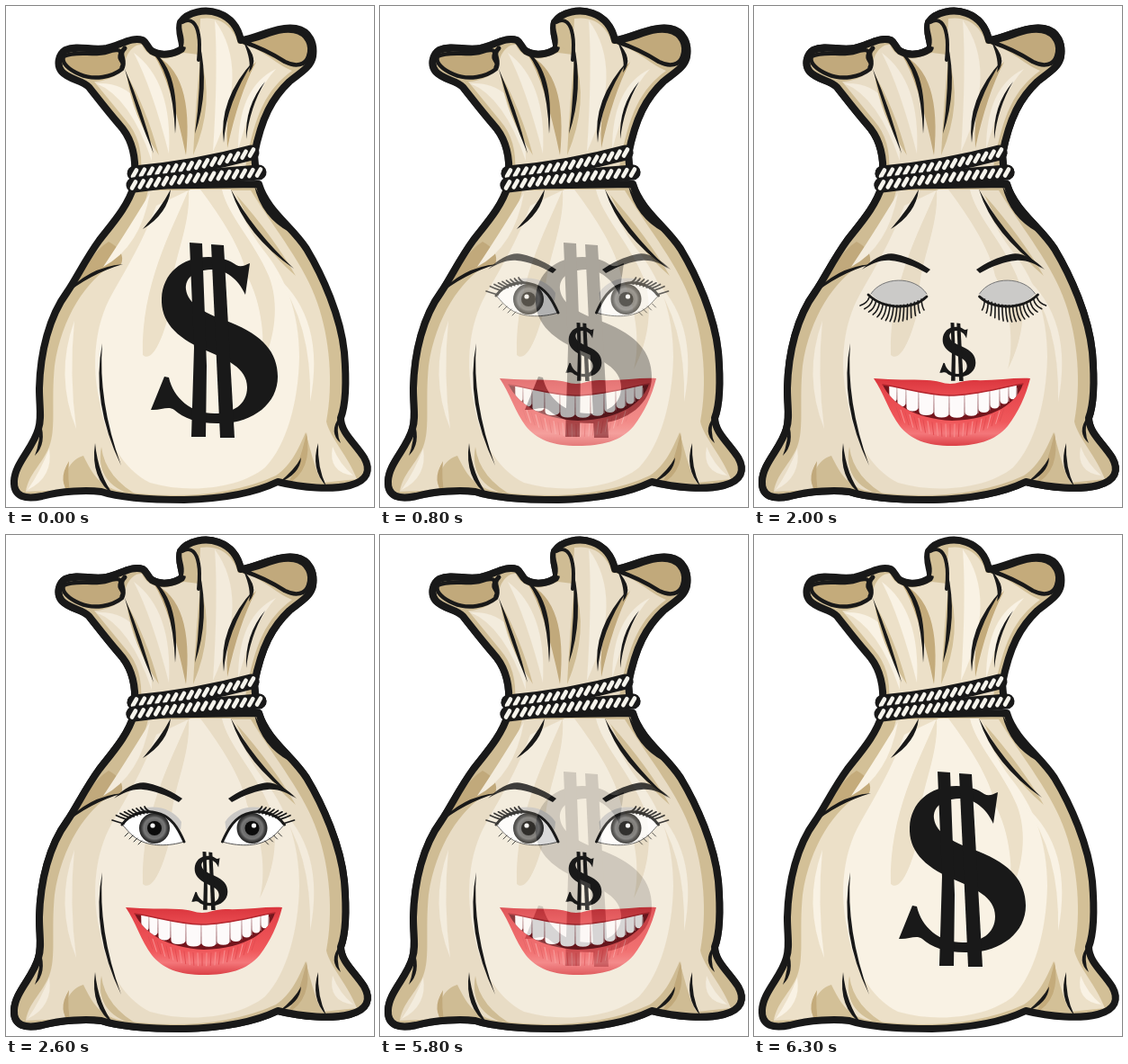
An HTML page with a canvas that plays this animation: 409 by 557 pixels, repeating every 6500 ms.

```html
<!DOCTYPE html>
<html lang="en">
<head>
<meta charset="utf-8">
<title>Money bag</title>
<style>
html, body { margin: 0; width: 100%; height: 100%; overflow: hidden; background: #fff; }
canvas { display: block; width: 100%; height: 100%; }
</style>
</head>
<body>
<canvas id="stage" width="409" height="557"></canvas>
<script>
const W = 409, H = 557, LOOP = 6500, INK = '#191919';
const stage = document.getElementById('stage').getContext('2d');
let g;

function layer(draw) {
  const c = document.createElement('canvas');
  c.width = W;
  c.height = H;
  g = c.getContext('2d');
  g.lineJoin = 'round';
  draw();
  return c;
}

function fill(d, color) {
  g.fillStyle = color;
  g.fill(new Path2D(d));
}

function line(d, width, color = INK, cap = 'round') {
  g.strokeStyle = color;
  g.lineWidth = width;
  g.lineCap = cap;
  g.stroke(new Path2D(d));
}

function inside(d, draw) {
  g.save();
  g.clip(new Path2D(d));
  draw();
  g.restore();
}

// Curved stroke that is pointed at both ends.
function blade(x0, y0, cx, cy, x1, y1, w, color = INK) {
  const len = Math.hypot(x1 - x0, y1 - y0);
  const nx = -(y1 - y0) / len * w, ny = (x1 - x0) / len * w;
  fill(`M${x0} ${y0}Q${cx + nx} ${cy + ny} ${x1} ${y1}Q${cx - nx} ${cy - ny} ${x0} ${y0}`, color);
}

function mirrored(axis, draw) {
  draw();
  g.save();
  g.translate(axis, 0);
  g.scale(-1, 1);
  draw();
  g.restore();
}

const BODY = 'M142 200C136 222 118 242 104 260C88 282 80 300 68 318C48 345 38 385 37 425C37 445 40 458 36 470C30 492 10 508 9 528C8 546 22 549 40 545C62 539 90 538 106 540C130 548 165 549 198 549C240 548 275 542 302 529C330 536 362 538 382 533C402 528 406 516 398 502C388 486 372 474 372 458C379 440 378 410 376 385C372 345 352 300 334 270C318 245 290 228 281 198Z';
const BODY_MID = 'M158 205C150 240 132 262 118 288C90 305 62 345 54 400C50 440 56 470 48 490C40 510 25 520 22 540L66 538C64 520 70 505 86 500C96 520 104 535 130 540C190 548 250 545 300 522C318 510 326 490 333 474C340 500 345 520 352 530L390 526C380 500 360 480 356 462C364 420 360 370 346 330C333 290 300 250 272 205Z';
const BODY_LIGHT = 'M167 222C152 262 135 290 118 320C98 355 95 400 104 440C110 480 130 515 160 530C205 543 260 536 288 513C312 488 325 440 326 390C326 340 310 300 285 270C270 250 258 225 250 204L205 204Z';
const NECK = 'M143 190C145 162 138 145 126 132C112 116 100 100 92 90C84 82 70 82 62 73C56 66 58 54 66 49C80 43 95 50 112 47C128 43 140 34 152 38C157 41 157 46 162 50C172 56 186 54 195 48C199 43 190 30 194 18C202 6 222 3 236 8C250 13 258 24 261 38C280 36 300 22 322 25C338 28 343 42 341 56C339 68 326 75 315 84C296 102 284 124 276 165L278 188Z';
const NECK_MID = 'M150 186C152 160 146 142 134 128L98 84C112 84 128 76 132 66C132 56 140 42 151 43C154 52 166 60 180 58L198 52L214 54L216 14C240 10 254 26 258 42C282 44 298 64 318 72C290 92 276 120 266 180Z';
const LEFT_LIP = 'M64 56C78 49 98 56 113 51C122 48 129 48 127 54C124 61 134 62 129 70C118 79 98 83 82 76C70 71 61 63 64 56Z';
const RIGHT_LIP = 'M264 40C286 37 300 25 320 28C335 31 340 44 336 56C333 66 322 68 310 62C296 53 282 46 264 40Z';
const CURL = 'M196 18C205 13 212 20 214 32C216 42 215 50 214 56C208 48 202 46 197 45C200 34 193 26 196 18Z';

function rope(x0, y0, cx, cy, x1, y1, count) {
  line(`M${x0} ${y0}Q${cx} ${cy} ${x1} ${y1}`, 17);
  for (let i = 0; i < count; i++) {
    const t = i / (count - 1), s = 1 - t;
    const x = s * s * x0 + 2 * s * t * cx + t * t * x1;
    const y = s * s * y0 + 2 * s * t * cy + t * t * y1;
    line(`M${x - 2} ${y + 3.5}L${x + 2} ${y - 3.5}`, 4.6, '#f6f4ec');
  }
}

function bag(light, mid, tan, deep) {
  fill(BODY, tan);
  inside(BODY, () => {
    fill(BODY_MID, mid);
    fill(BODY_LIGHT, light);
    fill('M78 311C88 290 98 272 114 262C126 268 132 278 128 287C112 292 96 300 78 311Z', deep);
    blade(160, 208, 140, 262, 108, 290, 11, light);
    fill('M203 204C184 250 150 310 152 388C166 400 180 350 184 330C180 290 206 250 203 204Z', mid);
    fill('M216 204C240 236 262 270 268 300C284 330 290 375 282 404C300 370 304 330 292 300C276 262 246 232 240 204Z', mid);
    blade(256, 210, 290, 262, 322, 300, 9, tan);
    blade(300, 300, 348, 350, 338, 440, 8, light);
    blade(76, 350, 62, 410, 78, 470, 8, light);
    blade(48, 492, 46, 520, 24, 538, 8, light);
    blade(363, 490, 364, 514, 386, 522, 8, light);
    blade(106, 490, 104, 530, 150, 546, 8, tan);
    blade(70, 506, 62, 528, 72, 544, 6, deep);
    blade(334, 474, 334, 514, 312, 532, 8, deep);
  });
  line(BODY, 8);
  blade(64, 322, 92, 294, 130, 287, 4);
  blade(183, 204, 176, 228, 152, 248, 5);
  blade(250, 204, 270, 252, 320, 292, 5);
  blade(276, 200, 288, 232, 316, 252, 5);
  blade(107, 375, 98, 440, 128, 511, 4);
  blade(99, 486, 98, 524, 120, 544, 5);
  blade(38, 462, 42, 486, 32, 500, 4);
  blade(347, 486, 342, 514, 356, 534, 4);
  blade(371, 456, 362, 474, 372, 486, 4);
  blade(303, 530, 324, 518, 328, 502, 4);

  fill(NECK, tan);
  inside(NECK, () => {
    fill(NECK_MID, mid);
    blade(100, 86, 150, 92, 162, 172, 15, light);
    blade(142, 52, 174, 88, 181, 164, 12, light);
    blade(232, 16, 254, 70, 230, 162, 18, light);
    blade(300, 70, 266, 94, 258, 160, 9, light);
    blade(134, 76, 148, 118, 170, 166, 9, tan);
    blade(164, 54, 196, 78, 200, 166, 14, deep);
    blade(216, 58, 222, 106, 208, 166, 11, tan);
    blade(278, 62, 250, 96, 246, 158, 9, deep);
  });
  line(NECK, 8);
  fill(LEFT_LIP, deep);
  line(LEFT_LIP, 4.5);
  fill(RIGHT_LIP, deep);
  line(RIGHT_LIP, 4.5);
  fill(CURL, tan);
  line('M196 18C206 12 212 20 214 32C216 42 215 50 214 60', 4);
  line('M129 68C134 60 124 54 132 47', 5);
  blade(132, 70, 148, 116, 164, 164, 4);
  blade(157, 46, 190, 68, 188, 142, 5);
  blade(215, 40, 222, 92, 210, 142, 5);
  blade(264, 40, 278, 60, 270, 74, 5);
  blade(276, 60, 240, 106, 242, 152, 5);
  blade(288, 84, 268, 112, 267, 148, 3);
  rope(143, 186, 210, 180, 273, 163, 16);
  rope(142, 199, 212, 190, 281, 185, 17);
}

function dollar() {
  fill('M271 286L266 321C258 303 244 293 228 293C208 294 199 303 200 315C202 332 222 342 250 352C285 366 302 385 302 412C302 442 275 463 240 464C215 465 198 459 187 449C180 444 172 450 161 449L176 412L181 413C186 436 206 453 232 453C252 453 268 443 268 424C268 402 245 393 220 382C188 368 172 350 173 325C174 298 195 279 225 279C240 279 249 283 256 288C261 291 266 288 271 286Z', INK);
  fill('M204 263L218 264L223 400L222 479L206 479L209 380Z', INK);
  fill('M228 265L242 266L254 480L238 480Z', INK);
}

function brow() {
  fill('M120 293C133 280 147 273 158 276C172 279 186 286 196 293L192 297C178 289 164 284 152 283C140 282 130 287 120 293Z', INK);
}

function openEye() {
  fill('M143 308C160 298 184 302 195 319L194 328C180 312 160 306 143 308Z', '#cac8c5');
  const white = 'M130 323C138 309 158 303 176 312C187 318 193 330 198 341C182 346 160 347 146 338C138 333 135 328 130 323Z';
  fill(white, '#fff');
  inside(white, () => {
    const iris = g.createRadialGradient(165, 326, 4, 165, 326, 17);
    iris.addColorStop(0, '#555');
    iris.addColorStop(.6, '#777');
    iris.addColorStop(.78, '#444');
    iris.addColorStop(1, '#222');
    disc(165, 326, 17, iris);
    disc(165, 326, 8, '#0c0c0c');
    disc(163, 323, 2.6, '#fff');
  });
  line('M130 323C135 328 138 333 146 338C160 347 182 346 198 341', 1, '#555');
  line('M129 322C138 309 158 303 176 312C187 318 193 330 198 341', 3);
  for (let i = 0; i < 9; i++) {
    const u = i / 8;
    const x = 131 + 30 * u, y = 321 - 13 * Math.sqrt(u);
    line(`M${x} ${y}Q${x - 7 + 2 * u} ${y - 2} ${118 + 36 * u} ${317 - 15 * Math.sqrt(u)}`, 1.7);
  }
  for (let i = 0; i < 4; i++) {
    line(`M${136 + i * 5} ${331 + i * 3}l-4 4`, .9);
  }
}

function closedEye() {
  fill('M130 320C142 301 178 299 192 320C184 337 146 339 130 320Z', '#cbcac8');
  line('M130 320C142 301 178 299 192 320', 1, '#777');
  line('M127 321C146 339 178 337 192 323', 2.8);
  for (let i = 0; i < 16; i++) {
    const u = i / 15, x = 128 + 58 * u;
    const y = 322 + 11 * Math.sin(Math.PI * (.06 + u * .82));
    const dx = -10 + 13 * u, dy = 5 + 13 * Math.sin(Math.PI * (.1 + .72 * u));
    line(`M${x} ${y}q${dx * .2} ${dy * .7} ${dx} ${dy}`, 1.6);
  }
}

function disc(x, y, r, color) {
  g.fillStyle = color;
  g.beginPath();
  g.arc(x, y, r, 0, Math.PI * 2);
  g.fill();
}

function mouth() {
  const lips = 'M133 414C155 416 174 415 192 416C204 416 210 420 218 420C226 420 232 416 244 416C266 417 288 413 307 414C302 434 294 451 282 467C268 484 246 489 220 489C192 489 174 482 162 467C150 451 144 430 133 414Z';
  const gap = 'M143 421C166 424 188 432 217 433C246 433 274 424 299 420C293 440 268 460 220 461C178 459 153 442 143 421Z';
  const red = g.createLinearGradient(0, 413, 0, 489);
  red.addColorStop(0, '#d9343c');
  red.addColorStop(.2, '#e6464c');
  red.addColorStop(.65, '#f0585b');
  red.addColorStop(.82, '#f4777a');
  red.addColorStop(1, '#db4046');
  fill(lips, red);
  inside(lips, () => {
    for (let i = 0; i < 25; i++) {
      const x = 158 + i * 5;
      const y = 465 - ((x - 219) / 66) ** 2 * 22;
      line(`M${x} ${y}l${(219 - x) * .08} 14`, 1, i % 2 ? '#f88f90' : '#e34d52');
    }
  });
  fill(gap, '#74161d');
  inside(gap, () => {
    const edges = [150, 159, 169, 183, 200, 217, 234, 249, 262, 273, 283, 292];
    for (let i = 0; i + 1 < edges.length; i++) {
      const a = edges[i], b = edges[i + 1], m = (a + b) / 2;
      const y = 458 - ((m - 218) / 70) ** 2 * 21;
      fill(`M${a} 415H${b}L${b - .5} ${y - 4}Q${b - 1} ${y} ${m} ${y}Q${a + 1} ${y} ${a + .5} ${y - 4}Z`, '#fdfafa');
      line(`M${b} 425V${y - 3}`, .8, '#d6c6c8');
    }
  });
  line('M143 421C166 424 188 432 217 433C246 433 274 424 299 420', 1.5, '#b3262e');
}

function face(eye, axis) {
  mirrored(443, brow);
  mirrored(axis, eye);
  mouth();
  g.save();
  g.translate(206 - 160 * .284, 352 - 263 * .3);
  g.scale(.284, .3);
  dollar();
  g.restore();
}

const plain = layer(() => {
  bag('#f9f2e4', '#ece0c8', '#d3c097', '#c4ab7b');
  dollar();
});
const smiling = layer(() => {
  bag('#f3ebdc', '#e8dcc5', '#cfbc94', '#c1a97c');
  face(openEye, 438.5);
});
const blinking = layer(() => {
  bag('#f3ebdc', '#e8dcc5', '#cfbc94', '#c1a97c');
  face(closedEye, 442.5);
});

const steps = (t, start) => Math.max(0, Math.min(6, Math.floor((t - start) / 100) + 1)) / 6;
const blinks = [2000, 2400, 4600];

function frame() {
  const t = performance.now() % LOOP;
  const shut = blinks.some(b => t >= b && t < b + 200);
  stage.globalAlpha = 1;
  stage.fillStyle = '#fff';
  stage.fillRect(0, 0, W, H);
  stage.drawImage(plain, 0, 0);
  stage.globalAlpha = steps(t, 500) - steps(t, 5800);
  stage.drawImage(shut ? blinking : smiling, 0, 0);
  requestAnimationFrame(frame);
}
frame();
</script>
</body>
</html>
```
